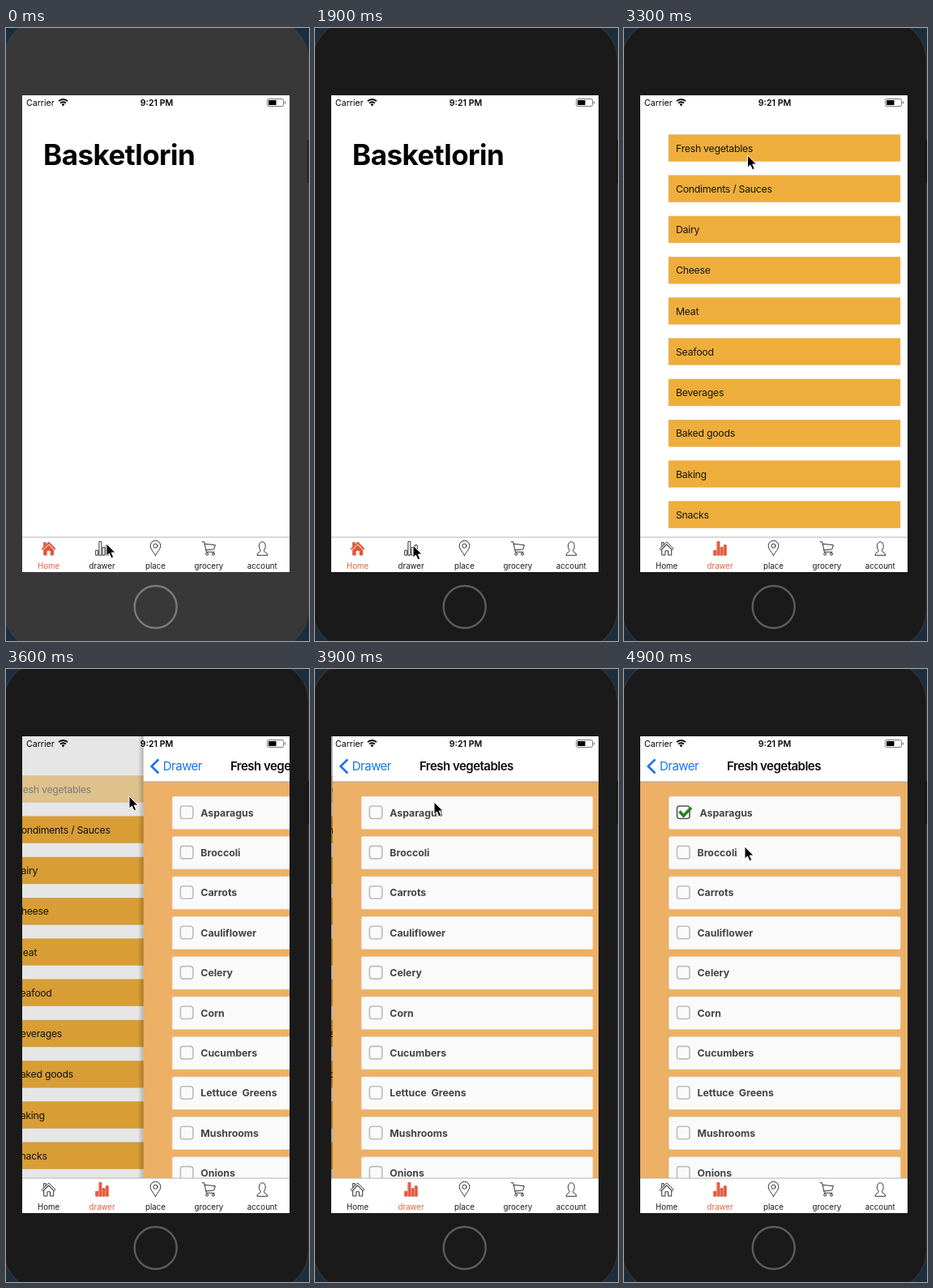
Write an HTML page that moves like this. It is 374 px wide and 756 px high and loops after 5000 ms.

```html
<!DOCTYPE html>
<html lang="en">
<head>
<meta charset="utf-8">
<title>Grocery app</title>
<style>
html, body { margin: 0; width: 100%; height: 100%; overflow: hidden; background: #1b2f40; }
svg { display: block; width: 374px; height: 756px; font-family: Inter, "Open Sans", sans-serif; }
text { white-space: pre; }
.mid { text-anchor: middle; }
.item { font-size: 12.3px; letter-spacing: -.022em; fill: #151515; }
.check { font-size: 12.3px; font-weight: 700; fill: #43444a; }
.nav { font-size: 15px; letter-spacing: -.035em; }
.status { font-size: 10.6px; }
.tab text { font-size: 9.7px; text-anchor: middle; fill: #1a1a1a; }
.tab g { fill: none; stroke: #333; stroke-width: 1; stroke-linejoin: round; stroke-linecap: round; }
.tab.on text { fill: #df5f42; }
.tab.on g { fill: #e2573a; stroke: #e2573a; }
.tab .cut { display: none; }
.tab.on .cut { display: inline; fill: none; stroke: #fff; }
</style>
</head>
<body>
<svg viewBox="0 0 374 756">
  <defs>
    <clipPath id="view"><rect x="20" y="83" width="330" height="545"/></clipPath>
    <linearGradient id="fade">
      <stop offset="0" stop-opacity="0"/><stop offset="1" stop-opacity=".22"/>
    </linearGradient>
  </defs>
  <rect id="desk" width="374" height="756"/>
  <rect id="body" x="-3" y="-11" width="376.5" height="779" rx="52" stroke-width="1.5"/>
  <rect id="side" x="372" y="138" width="2" height="53"/>
  <circle id="button" cx="184.7" cy="714" r="26" fill="none" stroke-width="2.4"/>
  <rect x="20" y="83" width="330" height="588" fill="#fff"/>

  <g clip-path="url(#view)">
    <text id="home" x="46" y="168.5" font-size="35" font-weight="700" letter-spacing="-.015em">Basketlorin</text>
    <g id="list"></g>
    <rect id="dim" x="20" y="83" width="330" height="545"/>
    <g id="card">
      <rect x="13" y="83" width="7" height="545" fill="url(#fade)"/>
      <rect x="20" y="83" width="330" height="56" fill="#fff"/>
      <rect x="20" y="139" width="330" height="489" fill="#ecb066"/>
      <rect x="20" y="138.5" width="330" height="1" fill="#b4a48f"/>
      <path d="M38.5 111.5 29.8 120l8.7 8.5" fill="none" stroke="#1d74e4" stroke-width="2.6"/>
      <text class="nav" x="44" y="125.4" fill="#1d74e4">Drawer</text>
      <text class="nav mid" x="185" y="125.4" font-weight="600" fill="#0c0c0c">Fresh vegetables</text>
      <g id="checks"></g>
    </g>
  </g>

  <text class="status" x="25" y="96">Carrier</text>
  <g fill="none" stroke="#000" stroke-width="1.9">
    <path d="M65 90.2a7.8 7.8 0 0 1 11 0M67.1 92.6a4.8 4.8 0 0 1 6.8 0"/>
    <path d="M70.5 96.4l-1.9-2.1a2.7 2.7 0 0 1 3.8 0z" fill="#000" stroke="none"/>
  </g>
  <text class="status mid" x="186" y="96" font-weight="600">9:21 PM</text>
  <rect x="322.5" y="87.5" width="20" height="9" rx="1.8" fill="#fff" stroke="#777"/>
  <rect x="324" y="89" width="9.5" height="6" fill="#000"/>
  <rect x="343.8" y="90.5" width="1.2" height="3" fill="#777"/>

  <rect x="20" y="627.5" width="330" height="1" fill="#b5b5b5"/>
  <g id="tabs"></g>
  <path id="cursor" d="M0 0V15.2L3.4 12 6 17.8 8.7 16.6 6.2 11H11Z" stroke="#fff" stroke-width="1"/>
</svg>
<script>
const $ = id => document.getElementById(id);
const set = (id, attrs) => {
  for (const key in attrs) $(id).setAttribute(key, attrs[key]);
};
const clamp = v => Math.max(0, Math.min(1, v));

const aisles = ['Fresh vegetables', 'Condiments / Sauces', 'Dairy', 'Cheese', 'Meat',
  'Seafood', 'Beverages', 'Baked goods', 'Baking', 'Snacks'];
const veggies = ['Asparagus', 'Broccoli', 'Carrots', 'Cauliflower', 'Celery',
  'Corn', 'Cucumbers', 'Lettuce  Greens', 'Mushrooms', 'Onions'];

// Tab icons are drawn around their own centre.
const bar = (x, h) => `<rect x="${x}" y="${8.5 - h}" width="2.6" height="${h}"/>`;
const tabs = [
  ['Home', `<path d="M-8.3 .5 0-7.8 8.3 .5 6.8 2 0-4.8-6.8 2ZM-6 1.5V8.3H-1.8V3H1.8V8.3H6V1.5L0-4.6ZM-6-2.2V-7.2H-3.6V-4.4"/>
    <path class="cut" d="M-6.8 2 0-4.8 6.8 2M-1.6 9V3.6H1.6V9"/>`],
  ['drawer', bar(-7.5, 6) + bar(-3.3, 16.8) + bar(.8, 9.5) + bar(5, 12.5)],
  ['place', '<path d="M0 9C-2 4.5-6.3 1-6.3-3.2A6.3 6.3 0 0 1 6.3-3.2C6.3 1 2 4.5 0 9Z"/><circle cy="-3" r="2.6"/>'],
  ['grocery', '<path d="M-8.3-8H-5.8L-3 4.5H6.5M-5.2-5.5 8-4 6.3 1.2-3.6 2.2"/><circle cx="-2.3" cy="7" r="1.5"/><circle cx="5.5" cy="7" r="1.5"/>'],
  ['account', '<path d="M-6.4 8.2C-6.4 4.6-2 5.4-2 2.6-5-.3-4.6-8 0-8S5-.3 2 2.6C2 5.4 6.4 4.6 6.4 8.2Z"/>']
];

$('list').innerHTML = '<rect x="20" y="83" width="430" height="545" fill="#fff"/>' + aisles.map((name, i) => {
  const y = 131.5 + i * 50.25;
  return `<g${i ? '' : ' id="pressed"'}>
    <rect x="55" y="${y}" width="286" height="33" fill="#efae3b" stroke="#d9bd7e" stroke-width=".5"/>
    <text class="item" x="64" y="${y + 21}">${name}</text></g>`;
}).join('');

$('checks').innerHTML = veggies.map((name, i) => {
  const y = 157 + i * 49.4;
  return `<rect x="55.5" y="${y + .3}" width="285.5" height="40" rx="1.5" fill="#fafafa" stroke="#e8e2da" stroke-width=".8"/>
    <rect ${i ? '' : 'id="box"'} x="65.5" y="${y + 12}" width="15.5" height="15.5" rx="3" fill="none" stroke="#bdbdbd" stroke-width="1.6"/>
    <text ${i ? '' : 'id="first"'} class="check" x="90.5" y="${y + 24.6}">${name}</text>`;
}).join('') + '<path id="tick" d="M68.5 175.5l5 5.5 9.5-10" fill="none" stroke="#2f7d27" stroke-width="3.6"/>';

$('tabs').innerHTML = tabs.map(([name, icon], i) => {
  const x = 52.7 + i * 65.9;
  return `<g class="tab" id="tab${i}"><g transform="translate(${x} 641.7)">${icon}</g>
    <text x="${x}" y="667">${name}</text></g>`;
}).join('');

// Pointer stops: time, x, y
const path = [[0, 124, 636], [100, 121, 638], [2200, 121, 638], [2400, 130, 520], [2600, 144, 332],
  [2800, 151, 205], [3000, 153, 157], [3600, 152, 157], [3900, 147, 164], [4400, 147, 165],
  [4700, 149, 221], [4800, 149, 221], [4900, 149, 219], [5000, 149, 219]];

function pointer(t) {
  const i = path.findIndex(p => p[0] > t);
  const [a, b] = [path[i - 1], path[i]];
  const u = (t - a[0]) / (b[0] - a[0]);
  return [1, 2].map(k => a[k] + (b[k] - a[k]) * u);
}

function draw(now) {
  const t = Math.floor(now / 100) * 100 % 5000;
  const focused = t >= 1900, drawer = t >= 2100, checked = t >= 4400;

  set('desk', { fill: focused ? '#1c2e3d' : '#182d3f' });
  set('body', { fill: focused ? '#1a1a1a' : '#383838', stroke: focused ? '#303336' : '#3c3d3f' });
  set('side', { fill: focused ? '#151515' : '#272322' });
  set('button', { stroke: focused ? '#5c5c5c' : '#7b7b7b' });

  set('home', { opacity: drawer ? 0 : 1 });
  $('tab0').classList.toggle('on', !drawer);
  $('tab1').classList.toggle('on', drawer);

  // Critically damped push of the detail card
  const k = 18.3 * Math.max(0, t - 3500) / 1000;
  const left = (1 + k) * Math.exp(-k), p = 1 - left;
  set('list', { opacity: drawer ? 1 : 0, transform: `translate(${-99 * p} 0)` });
  set('pressed', { opacity: 1 - .5 * clamp((t - 3300) / 150) });
  set('dim', { opacity: .18 * p });
  set('card', { transform: `translate(${330 * left} 0)`, opacity: t > 3500 ? 1 : 0 });

  set('box', { stroke: checked ? '#55585c' : '#bdbdbd' });
  set('tick', { opacity: checked ? 1 : 0 });
  set('first', { x: checked ? 93.5 : 90.5 });
  set('cursor', { transform: `translate(${pointer(t)})` });
  requestAnimationFrame(draw);
}
draw(0);
</script>
</body>
</html>
```
